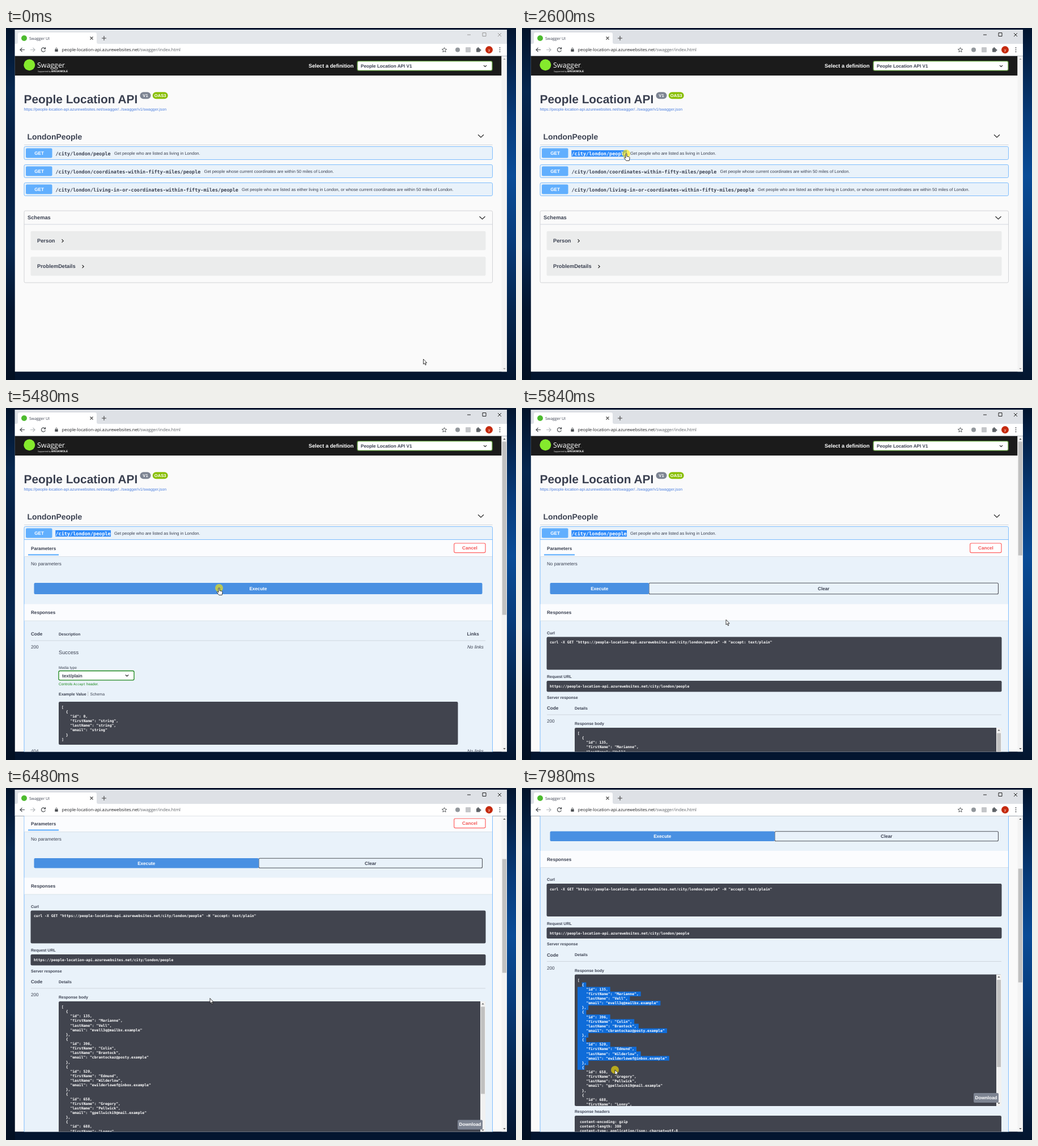
Animation, 900 px wide and 622 px high, one loop 8000 ms. Source, as an HTML page:

```html
<!DOCTYPE html>
<html lang="en">
<head>
<meta charset="utf-8">
<title>People Location API</title>
<style>
html, body { margin: 0; width: 100%; height: 100%; overflow: hidden; background: #03142d; }
svg { display: block; width: 900px; height: 622px; }
text { font-family: "Liberation Sans", Arial, sans-serif; fill: #3b4151; white-space: pre; text-rendering: geometricPrecision; }
.b { font-weight: 700; }
.i { font-style: italic; }
.m { font-family: "DejaVu Sans Mono", monospace; font-weight: 700; }
.u { font-family: "Open Sans", sans-serif; }
.w { fill: #fff; }
.c { text-anchor: middle; }
.line { fill: none; stroke: #222; stroke-width: 1.1; }
</style>
</head>
<body>
<svg id="stage" viewBox="0 0 900 622"></svg>
<script>
const LOOP = 8000;
const BLUE = '#61affe', DARK = '#41444e', GREY = '#5f6368';
const PATH_CH = 5.117, CODE_CH = 3.853, CODE_LH = 8.13;

// Markup helpers
const text = (x, y, s, size = 8.13, cls = '', extra = '') =>
  `<text x="${x}" y="${y}" font-size="${size}" class="${cls}" ${extra}>${s}</text>`;
const rect = (x, y, w, h, fill, r = 0, extra = '') =>
  `<rect x="${x}" y="${y}" width="${w}" height="${h}" rx="${r}" fill="${fill}" ${extra}/>`;
const frame = (x, y, w, h, stroke, sw, fill = 'none') =>
  rect(x, y, w, h, fill, 2.3, `stroke="${stroke}" stroke-width="${sw}"`);
const rule = (x, y, x2, color = '#c9ced6') => rect(x, y - .4, x2 - x, .8, color);
const path = (d, extra = '') => `<path class="line" d="${d}" ${extra}/>`;
const circle = (x, y, r, fill) => `<circle cx="${x}" cy="${y}" r="${r}" fill="${fill}"/>`;
const group = (id, body, extra = '') => `<g id="${id}" ${extra}>${body}</g>`;
const code = (x, y, lines) =>
  lines.map((s, k) => text(x, y + k * CODE_LH, s, 6.4, 'm w')).join('');
const label = (x, y, s) => text(x, y, s, 6.96, 'b');
const down = (x, y, w = 5) => path(`M${x - w} ${y - w / 2}l${w} ${w * .95}l${w} ${-w * .95}`);
const gradient = (id, stops) => `<linearGradient id="${id}" x2="0" y2="1">` +
  stops.map(([o, c]) => `<stop offset="${o}" stop-color="${c}"/>`).join('') + '</linearGradient>';

const people = [
  [135, 'Marianne', 'Vell', 'mvell3q@mailbx.example'],
  [396, 'Colin', 'Brantock', 'cbrantockaz@posty.example'],
  [520, 'Edmund', 'Wilderlow', 'ewilderlowef@inbox.example'],
  [658, 'Gregory', 'Pellwick', 'gpellwicki9@mail.example'],
  [688, 'Lonny', 'Ambrel', 'lambrelj3@mail.example']
];
const record = (id, first, last, mail) => ['  {', `    "id": ${id},`, `    "firstName": "${first}",`,
  `    "lastName": "${last}",`, `    "email": "${mail}"`];
const json = ['[', ...people.flatMap(p => [...record(...p), '  },'])].slice(0, 28);
const host = 'https://people-location-api.azurewebsites.net/city/london/people';

function wallpaper() {
  return `<defs>${gradient('left', [[0, '#03132a'], [.18, '#06274f'], [.36, '#041d40'], [.62, '#062750'], [.8, '#03152f'], [1, '#020f22']])}
    ${gradient('right', [[0, '#03152f'], [.25, '#073a78'], [.42, '#0a4c97'], [.6, '#073c7c'], [.8, '#05264f'], [1, '#03152f']])}
    <clipPath id="view"><rect x="15.5" y="49.5" width="868.5" height="558"/></clipPath>
    <clipPath id="body"><rect x="93" y="218.5" width="744" height="232.5"/></clipPath></defs>` +
    rect(0, 0, 900, 622, '#03152f') + rect(0, 0, 16, 622, 'url(#left)') + rect(884, 0, 16, 622, 'url(#right)');
}

function browser() {
  return `<rect id="tabs" x="15.5" y="3" width="868.5" height="25"/>` +
    path('M18 28c2 0 3-1 3-3V11q0-3 3-3H157q3 0 3 3V25c0 2 1 3 3 3z', 'style="fill:#fff;stroke:none"') +
    rect(15.5, 28, 868.5, 21.5, '#fff') +
    circle(32, 18, 5, '#4dbb2f') + text(41, 20.5, 'Swagger UI', 6.9, 'u') +
    path('M148.5 15.5l5 5m0-5l-5 5M169 18h8m-4-4v8', 'style="stroke:#444"') +
    group('buttons', '<path d="M814 12h6M841 8.5h6v6h-6zM868 9l6 6m0-6l-6 6"/>', 'fill="none"') +
    path('M33 38.5h-8l3.5-3.5M25 38.5l3.5 3.5', 'style="stroke:#4a4d51"') +
    path('M43 38.5h8l-3.5-3.5M51 38.5l-3.5 3.5', 'style="stroke:#b5b8bc"') +
    path('M69 36.5a3.6 3.6 0 1 0 .4 3M69.6 34v3h-3', 'style="stroke:#4a4d51"') +
    rect(86.3, 37.5, 5.4, 4.3, '#4a4d51', .6) + path('M87.6 38v-1.5a1.4 1.4 0 0 1 2.8 0V38', 'style="stroke:#4a4d51;stroke-width:.8"') +
    text(98.5, 41.3, `people-location-api.azurewebsites.net<tspan fill="${GREY}">/swagger/index.html</tspan>`, 7.7, 'u', 'style="fill:#202124"') +
    path('M773.5 34.5l1.2 2.7 3 .3-2.3 2 .7 2.9-2.6-1.6-2.6 1.6.7-2.9-2.3-2 3-.3z', 'style="stroke:#4a4d51;stroke-width:.9"') +
    circle(797, 38.5, 4, '#92979c') + rect(811, 34, 9, 9, '#c4c6c9', 1) +
    rect(830, 36, 6.5, 6.5, GREY, .8) + circle(833.2, 35.5, 1.5, GREY) + circle(837, 39, 1.5, GREY) +
    circle(852.5, 38.5, 6.5, '#c5290d') + text(852.5, 40.5, 'y', 6.5, 'w c') +
    [35, 38.5, 42].map(y => circle(871.5, y, .9, '#4a4d51')).join('');
}

function header() {
  return rect(15.5, 49.5, 859, 34.5, '#1b1b1b') +
    circle(41.3, 65.3, 10, '#85ea2d') + text(55, 69.5, 'Swagger', 12.4, 'u w') + text(103.3, 69.5, '.', 6, 'w') +
    text(56, 77.5, 'Supported by', 3.7, 'u w') + text(80, 77.5, 'BRISKMOLE', 4.9, 'b w') +
    text(534, 69.7, 'Select a definition', 9.29, 'b w') +
    frame(620, 58.7, 238, 16.4, '#62a03f', 1.3, '#fff') + text(626, 69.8, 'People Location API V1', 8.13, 'b') + down(845.5, 67.2, 2.6) +
    text(31.5, 132.5, 'People Location API', 20.85, 'b') +
    rect(236.5, 113.3, 19, 12, '#7d8492', 6) + text(246, 122, 'V1', 7.6, 'b w c') +
    rect(258.7, 113.3, 27, 12, '#89bf04', 6) + text(272.2, 122, 'OAS3', 7.6, 'b w c') +
    text(31.5, 146, 'https://people-location-api.azurewebsites.net/swagger/../swagger/v1/swagger.json', 6.96, '', 'style="fill:#4b7fe0"') +
    text(37.5, 196.5, 'LondonPeople', 13.93, 'b') + down(838, 191) + rule(32, 206.5, 858.5);
}

const row = (y, url, note, extra = '') =>
  rect(35, y + 3, 46.5, 17, BLUE, 2) + text(58.5, y + 14.7, 'GET', 8.13, 'b w c') + extra +
  text(87.5, y + 15.2, url, 8.5, 'm') + text(87.5 + url.length * PATH_CH + 6.2, y + 14.6, note, 7.53);
const block = (y, h) => frame(32, y, 826.5, h, BLUE, .8, '#e9f2fa');

function list() {
  const schema = (y, name, x) => rect(43.5, y, 803, 33.5, '#ebecec', 2) + text(55, y + 19.8, name, 9.29, 'b') +
    path(`M${x} ${y + 14.5}l2.8 2.7l-2.8 2.7`);
  return block(209.5, 23) + block(241.5, 23) + block(273.5, 23) +
    row(241.5, '/city/london/coordinates-within-fifty-miles/people', 'Get people whose current coordinates are within 50 miles of London.') +
    row(273.5, '/city/london/living-in-or-coordinates-within-fifty-miles/people', 'Get people who are listed as either living in London, or whose current coordinates are within 50 miles of London.') +
    frame(32, 323, 826.5, 127, '#c8cacd', .8) + rule(32, 347, 858.5) + text(38, 338.2, 'Schemas', 9.29, 'b') + down(840.5, 335.5) +
    schema(359, 'Person', 98.5) + schema(404.3, 'ProblemDetails', 134.5);
}

const band = (y, title) => rect(32.5, y, 825.5, 29.5, '#fbfcfe') + rule(32.5, y + 29.5, 858, '#d3dbe3') + text(44, y + 17.5, title, 8.13, 'b');

// Coordinates start at the top of the Responses band
function docs() {
  return text(44, 55.5, 'Code', 8.13, 'b') + label(93, 55, 'Description') + text(813.5, 55.5, 'Links', 8.13, 'b') + rule(44, 64.5, 846) +
    text(44, 78.5, '200') + text(814, 78.5, 'No links', 8.13, 'i') + text(93, 88, 'Success', 9.29) +
    text(93, 114.7, 'Media type', 6.5) + frame(93, 118, 133, 16.3, '#1c871c', 1.3, '#fff') +
    text(99, 129, 'text/plain', 8.13, 'b') + down(213.5, 126.3, 2.6) +
    text(93, 143, 'Controls <tspan font-family="DejaVu Sans Mono, monospace" font-size="5.8">Accept</tspan> header.', 6.5, '', 'style="fill:#1c871c"') +
    label(93, 161, 'Example Value') + rect(144.5, 154.5, .6, 8, '#aaa') + text(148.5, 161, 'Schema', 6.96) +
    rect(93, 172.5, 704.5, 76, DARK, 2.3) +
    code(98, 184.3, ['[', ...record(0, 'string', 'string', 'string'), '  }', ']']) +
    text(44, 262.5, '404') + text(814, 262.5, 'No links', 8.13, 'i') + text(93, 272, 'Not Found', 9.29);
}

function result() {
  return label(44, 53, 'Curl') + rect(43.5, 58, 803, 58, DARK, 2.3) +
    code(49, 69.5, [`curl -X GET "${host}" -H "accept: text/plain"`]) +
    label(44, 130.5, 'Request URL') + rect(43.5, 135.5, 803, 19.5, DARK, 2.3) + code(49, 147.5, [host]) +
    label(44, 167, 'Server response') + text(44, 186.5, 'Code', 8.13, 'b') + label(93, 186, 'Details') + rule(44, 195.5, 846) +
    text(44, 209.5, '200') + label(93, 213.5, 'Response body') +
    rect(93, 218.5, 753, 232.5, DARK, 2.3) + rect(837, 218.5, 9, 232.5, '#f1f1f1') + rect(838, 228, 7, 154, '#c1c1c1') +
    '<path d="M839.3 224h4.4l-2.2-2.4zM839.3 445h4.4l-2.2 2.4z" fill="#666"/>' +
    group('lines', '<path id="picked" fill="#0f6cd9"/>' + code(98, 230.5, json), 'clip-path="url(#body)"') +
    rect(797, 428, 44, 17, '#7d8492', 2) + text(819, 438.8, 'Download', 8.13, 'b w c') +
    label(93, 463, 'Response headers') + rect(93, 468, 753, 58, DARK, 2.3) +
    code(102, 480.5, ['content-encoding: gzip', 'content-length: 380', 'content-type: application/json; charset=utf-8']);
}

function panel() {
  return block(209.5, 1000) + rule(32, 232.5, 858.5, BLUE) + band(233, 'Parameters') + rect(39, 258.3, 54, 2.2, BLUE) +
    text(44, 278, 'No parameters') +
    group('try', frame(783.3, 239, 62.7, 16.6, '#50535a', 1.2, '#fff') + text(814.8, 250.2, 'Try it out', 8.13, 'b c')) +
    group('cancel', frame(790.7, 239, 55.3, 16.6, '#ff6060', 1.2, '#fff') + text(818.4, 250.2, 'Cancel', 8.13, 'b c', 'style="fill:#f25555"')) +
    group('run', '<rect id="clear" y="309.3" fill="none" stroke="#50535a" stroke-width="1.1" rx="2"/><rect id="exec" x="49.5" y="309" fill="#4990e2" rx="2"/>' +
      text(0, 0, 'Execute', 8.13, 'b w c', 'id="execText"') + text(0, 0, 'Clear', 8.13, 'b c', 'id="clearText"')) +
    group('lower', band(0, 'Responses') + group('docs', docs()) + group('result', result()));
}

function pointer() {
  const skin = 'fill="#fff" stroke="#111" stroke-width=".8" stroke-linejoin="round"';
  return '<circle id="press" r="7" fill="#ffe600" opacity=".62"/>' +
    group('arrow', '<path d="M0 0V9l2-1.8 1.5 3.4 1.4-.6-1.5-3.3h2.8z"/>', skin) +
    group('hand', '<path d="M-1 .8c0-1.4 2-1.4 2 0v4l3.6.9c1.2.3 1.6.9 1.4 2.1l-.8 4.7h-5.4l-3.3-4.4c-.7-1 .6-2 1.4-1.1l1.1 1z"/>', skin) +
    group('beam', '<path d="M-2-4.3h1.4l.6.5.6-.5H2M-2 4.3h1.4l.6-.5.6.5H2M0-4V4" fill="none" stroke="#222" stroke-width=".9"/>');
}

const $ = id => document.getElementById(id);
$('stage').innerHTML = wallpaper() + browser() +
  `<g clip-path="url(#view)">${rect(15.5, 49.5, 868.5, 558, '#fafafa')}` +
  group('page', header() + group('list', list()) + group('panel', panel()) +
    row(209.5, '/city/london/people', 'Get people who are listed as living in London.', '<rect id="mark" x="87.3" y="216" height="11.3" fill="#2f8bfa"/>')) +
  rect(874.5, 49.5, 9.5, 558, '#f3f3f3') + '<rect id="thumb" x="875.7" width="7.3" fill="#c1c1c1"/>' +
  '<path id="arrows" d="M877.3 56h4.4l-2.2-2.4zM877.3 601h4.4l-2.2 2.4z"/></g>' + pointer();
const pathText = $('mark').nextElementSibling;

const bursts = [[70, 810, 11], [880, 1130, 4], [1360, 2130, 11], [2450, 2600, 3], [2770, 2920, 3], [3130, 3910, 11],
  [4010, 4160, 3], [4380, 5150, 11], [5480, 6250, 11], [6320, 6320, 1], [6480, 7250, 11], [7350, 7980, 9]];
// Time, x, y of the pointer tip
const moves = [[0, 736.5, 585], [580, 48, 320], [810, 80, 229], [1130, 87, 222], [1300, 87, 222], [2130, 178, 222],
  [2380, 178, 222], [2600, 184, 222], [2700, 184, 222], [2920, 185, 222], [3060, 185, 222], [3910, 785, 250],
  [4160, 809, 246], [4380, 809, 246], [5150, 376, 318], [5480, 376, 318], [5788, 360, 374], [6250, 360, 371.5],
  [6480, 360, 371.5], [7090, 115, 352], [7250, 107, 347], [7350, 107, 347], [7980, 164, 498]];
const scrolls = [[6100, 0], [6174, 25], [6250, 93.5], [6320, 139], [6480, 185], [6560, 215], [6640, 232.5]];
const shapes = [[0, 'arrow'], [730, 'hand'], [3200, 'arrow'], [3900, 'hand'], [4500, 'arrow'], [5000, 'hand'],
  [5700, 'arrow'], [6240, 'beam'], [6480, 'arrow']];
const presses = [[1360, 2130], [2600, 2770], [2920, 3130], [4380, 4450], [5480, 5600], [7350, LOOP]];

function snap(t) {
  const b = bursts.findLast(b => t >= b[0]);
  if (!b) return 0;
  const [a, z, n] = b, step = n > 1 ? (z - a) / (n - 1) : 1;
  return a + Math.min(n - 1, Math.floor((t - a) / step + 1e-6)) * step;
}
function sample(table, t) {
  const k = table.findIndex(p => p[0] > t);
  if (k === 0) return table[0].slice(1);
  if (k < 0) return table.at(-1).slice(1);
  const [p, q] = [table[k - 1], table[k]];
  const u = (t - p[0]) / (q[0] - p[0]), e = u * u * (3 - 2 * u);
  return p.slice(1).map((v, i) => v + (q[i + 1] - v) * e);
}
const show = (id, on) => { $(id).style.display = on ? '' : 'none'; };
const set = (id, attrs) => { for (const k in attrs) $(id).setAttribute(k, attrs[k]); };
const clamp = (v, a, b) => Math.max(a, Math.min(b, v));

function runButtons(t, done) {
  const [grow] = sample([[5790, 0], [6096, 1]], t);
  const w = done ? 174.5 + 222 * grow : 791, h = 20 - 2.5 * grow, y = 309 + h / 2 + 2.9;
  set('exec', { width: w, height: h });
  set('execText', { x: 49.5 + w / 2, y });
  set('clear', { x: 49.5 + w, width: 791 - w, height: h - .6 });
  set('clearText', { x: 49.5 + w + (791 - w) / 2, y });
  show('clear', done);
  show('clearText', done);
  return 346.5 - 3 * grow;
}

function pickLines(t, y) {
  let d = '';
  if (t > 7400) {
    const last = clamp(Math.floor((y - 335.5) / CODE_LH), 1, 27);
    for (let k = 1; k <= last; k++) {
      const x = k === 1 ? 98 + 2 * CODE_CH : 98;
      const end = 98 + json[k].length * CODE_CH + (k < last ? 3.8 : 1);
      d += `M${x} ${224.3 + k * CODE_LH}H${end}v${CODE_LH + .1}H${x}z`;
    }
  }
  set('picked', { d });
}

function draw(now) {
  const t = snap(now % LOOP);
  const focus = t >= 1360, open = t >= 3130, editing = t >= 4450, done = t >= 5700;
  const [x, y] = sample(moves, t), [scroll] = sample(scrolls, t);

  set('tabs', { fill: focus ? '#dee1e6' : '#e4e7eb' });
  set('buttons', { stroke: focus ? '#222' : '#999' });
  set('page', { transform: `translate(0 ${-scroll})` });
  show('list', !open);
  show('panel', open);
  show('try', !editing);
  show('cancel', editing);
  show('run', editing);
  show('docs', !done);
  show('result', done);
  const lowerY = runButtons(t, done);
  set('lower', { transform: `translate(0 ${editing ? lowerY : 314.5})` });

  const chars = focus ? t > 2500 ? 19 : clamp(Math.round((x - 87.3) / PATH_CH), 0, 19) : 0;
  set('mark', { width: chars * PATH_CH + (chars ? .5 : 0) });
  pathText.style.fill = chars > 9 ? '#fff' : '';
  pickLines(t, y);

  show('thumb', open);
  set('thumb', { y: 59.5 + scroll * .357, height: done ? 201 : editing ? 306 : 315.5 });
  set('arrows', { fill: open ? '#555' : '#a3a3a3' });

  const shape = shapes.findLast(s => t >= s[0])[1];
  for (const id of ['arrow', 'hand', 'beam']) {
    show(id, id === shape);
    set(id, { transform: `translate(${x} ${y})` });
  }
  show('press', presses.some(([a, b]) => t >= a && t < b));
  set('press', { cx: x, cy: y });
}

function tick() {
  draw(performance.now());
  requestAnimationFrame(tick);
}
tick();
</script>
</body>
</html>
```
